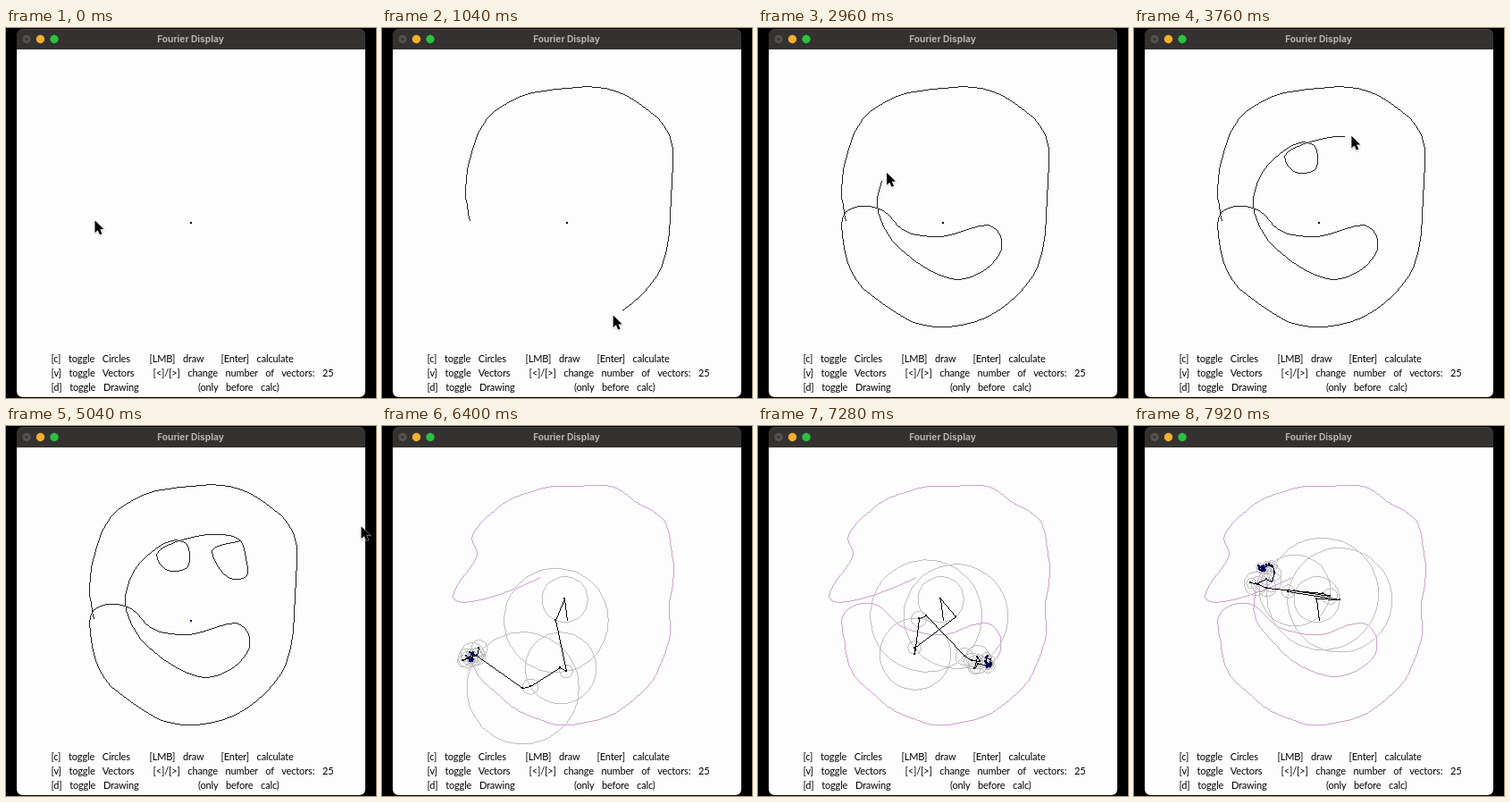
An HTML page with a canvas that plays this animation: 414 px wide and 414 px high, repeating every 8000 ms.

```html
<!DOCTYPE html>
<html lang="en">
<head>
<meta charset="utf-8">
<title>Fourier Display</title>
<style>
html, body { margin: 0; width: 100%; height: 100%; overflow: hidden; background: #000; }
svg, canvas { position: absolute; left: 0; top: 0; width: 414px; height: 414px; }
.title { font: 700 10.2px Inter, sans-serif; fill: #b4b2af; text-anchor: middle; }
.help { font: 400 11px Lato, sans-serif; letter-spacing: -0.15px; word-spacing: 6px; fill: #000; }
</style>
</head>
<body>
<svg viewBox="0 0 414 414">
  <rect x="12" y="1" width="390" height="60" rx="7" fill="#4a4946"/>
  <rect x="12" y="2" width="390" height="60" rx="7" fill="#333230"/>
  <path d="M12 24H402V406Q402 413 395 413H19Q12 413 12 406Z" fill="#fdfdfd"/>
  <circle cx="23" cy="12.5" r="4.7" fill="#53524f"/>
  <circle cx="23" cy="12.5" r="1.4" fill="#2f2e2c"/>
  <circle cx="38.5" cy="12.5" r="4.7" fill="#f6b02c"/>
  <circle cx="54" cy="12.5" r="4.7" fill="#2ac23f"/>
  <text class="title" x="206.5" y="16">Fourier Display</text>
  <g class="help">
    <text x="50.5" y="374">[c] toggle Circles</text>
    <text x="160.5" y="374">[LMB] draw</text>
    <text x="240.5" y="374">[Enter] calculate</text>
    <text x="50.5" y="390">[v] toggle Vectors</text>
    <text x="164.5" y="390">[&lt;]/[&gt;] change number of vectors: 25</text>
    <text x="50.5" y="406">[d] toggle Drawing</text>
    <text x="215" y="406">(only before calc)</text>
  </g>
</svg>
<canvas width="414" height="414"></canvas>
<script>
const ctx = document.querySelector('canvas').getContext('2d');
const LOOP = 8000, STEP = 80, TAU = Math.PI * 2;
const LEAVE = 4640, CALC = 6000, TURN = 4950;
const CENTER = [207, 218], ORDER = 25, SAMPLES = 720;
const INK = '#1c1c1c', NAVY = '#00005c', PLUM = '#cfa0d2', GREY = '#bebebe';

const mix = (a, b, k) => a + (b - a) * k;
const clamp01 = v => Math.min(1, Math.max(0, v));
const distance = (p, q) => Math.hypot(q[0] - p[0], q[1] - p[1]);

// Key points of one stroke: head, mouth, left eye, right eye.
const knots = `98,216 93,180 101,135 117,101 155,76 207,67 250,67 290,86 321,119 323,190 313,265
  280,307 240,329 185,332 145,312 110,282 95,240 97,206 118,199 140,204 163,226 205,233
  258,220 271,233 270,252 245,275 215,280 165,252 140,222 133,190 149,153 185,128
  201,131 203,157 180,161 168,143 190,129 235,121 261,127 268,148 268,168 250,170 230,139 262,128`
  .split(/\s+/).map(pair => pair.split(',').map(Number));

// Centripetal spline through the knots.
const gap = i => Math.sqrt(distance(knots[i], knots[i + 1]));
function tangent(i, c) {
  const slope = j => (knots[j + 1][c] - knots[j][c]) / gap(j);
  if (i === 0) return slope(0);
  if (i === knots.length - 1) return slope(i - 1);
  return (slope(i - 1) * gap(i) + slope(i) * gap(i - 1)) / (gap(i - 1) + gap(i));
}
function splineAt(i, k) {
  const k2 = k * k, k3 = k2 * k, h = 3 * k2 - 2 * k3;
  return [0, 1].map(c => mix(knots[i][c], knots[i + 1][c], h) +
    gap(i) * (tangent(i, c) * (k3 - 2 * k2 + k) + tangent(i + 1, c) * (k3 - k2)));
}
const points = [knots[0]];
for (let i = 0; i < knots.length - 1; i++) {
  for (let k = 1; k <= 4; k++) points.push(splineAt(i, k / 4));
}
const lengths = [0];
for (let i = 1; i < points.length; i++) lengths.push(lengths[i - 1] + distance(points[i - 1], points[i]));
const total = lengths[lengths.length - 1];

function pointAt(share) {
  const length = share * total;
  let i = 1;
  while (i < points.length - 1 && lengths[i] < length) i++;
  const k = (length - lengths[i - 1]) / (lengths[i] - lengths[i - 1]);
  return [0, 1].map(c => mix(points[i - 1][c], points[i][c], k));
}

// The hand slows down: [time, share of the stroke drawn].
const pace = [[80, 0], [880, 0.304], [2080, 0.61], [3760, 0.902], [4560, 1]];
function drawnAt(t) {
  let i = 1;
  while (i < pace.length - 1 && pace[i][0] < t) i++;
  const [t0, a] = pace[i - 1], [t1, b] = pace[i];
  return mix(a, b, clamp01((t - t0) / (t1 - t0)));
}

const samples = Array.from({ length: SAMPLES }, (_, i) => {
  const u = (i + 0.5) / SAMPLES;
  return pointAt(u + 0.012 * Math.sin(Math.PI * u)).map((v, c) => v - CENTER[c]);
});

// Fourier coefficients in the order 0, -1, 1, -2, 2 ...
const freqs = [0];
for (let n = 1; n <= ORDER; n++) freqs.push(-n, n);
const vectors = freqs.map(n => {
  let re = 0, im = 0;
  samples.forEach(([x, y], i) => {
    const a = -n * (i + 0.5) / SAMPLES * TAU, c = Math.cos(a), s = Math.sin(a);
    re += x * c - y * s;
    im += x * s + y * c;
  });
  return { n, r: Math.hypot(re, im) / SAMPLES, angle: Math.atan2(im, re) };
});

function jointsAt(turn) {
  let [x, y] = CENTER;
  const joints = [[x, y]];
  for (const { n, r, angle } of vectors) {
    x += r * Math.cos(angle + n * turn * TAU);
    y += r * Math.sin(angle + n * turn * TAU);
    joints.push([x, y]);
  }
  return joints;
}
const TRACE_STEPS = 360;
const trace = Array.from({ length: TRACE_STEPS }, (_, i) => jointsAt(i / TRACE_STEPS).pop());

// Lines without smoothing, one pixel wide.
function pixelLine(path, color) {
  ctx.fillStyle = color;
  const dots = path.map(p => p.map(Math.round));
  for (let j = 1; j < dots.length; j++) {
    const [x0, y0] = dots[j - 1], [x1, y1] = dots[j];
    const n = Math.max(1, Math.abs(x1 - x0), Math.abs(y1 - y0));
    for (let i = 1; i <= n; i++) {
      ctx.fillRect(Math.round(mix(x0, x1, i / n)), Math.round(mix(y0, y1, i / n)), 1, 1);
    }
  }
}

function pixelCircle([x, y], r) {
  const n = Math.ceil(8 + r);
  pixelLine(Array.from({ length: n + 1 }, (_, i) =>
    [x + r * Math.cos(i / n * TAU), y + r * Math.sin(i / n * TAU)]), GREY);
}

function dot([x, y], color) {
  ctx.fillStyle = color;
  ctx.fillRect(Math.round(x) - 1, Math.round(y) - 1, 2, 2);
}

function drawPen(t) {
  const share = drawnAt(t);
  if (share) pixelLine([...points.filter((_, i) => lengths[i] < share * total), pointAt(share)], INK);
  dot(CENTER, NAVY);
}

function drawCursor(t) {
  const [px, py] = pointAt(drawnAt(t > 80 ? t + 33 : t));
  const k = clamp01((t - LEAVE) / 400), ease = k * k * (3 - 2 * k);
  const drift = 3 * clamp01((t - 5120) / 160);
  ctx.save();
  ctx.translate(mix(px + 1, 397, ease) + drift, mix(py - 1, 112, ease));
  ctx.shadowColor = 'rgba(0,0,0,.4)';
  ctx.shadowBlur = 2.5;
  ctx.shadowOffsetY = 1;
  ctx.lineWidth = 1.2;
  ctx.strokeStyle = 'rgba(255,255,255,.6)';
  const arrow = new Path2D('M.5 .5V14L3.7 11.2 6 16.3 8.4 15.3 6.2 10.3 10.3 10.1Z');
  ctx.stroke(arrow);
  ctx.shadowColor = 'transparent';
  ctx.fillStyle = '#000';
  ctx.fill(arrow);
  ctx.restore();
}

function drawFourier(t) {
  const turn = 0.375 + (t - CALC) / TURN;
  const joints = jointsAt(turn);
  pixelLine([...trace.slice(0, Math.ceil(turn * TRACE_STEPS)), joints[vectors.length]], PLUM);
  vectors.forEach(({ n, r }, i) => n && pixelCircle(joints[i], r));
  vectors.forEach(({ n }, i) => {
    pixelLine([joints[i], joints[i + 1]], '#000');
    dot(joints[i + 1], Math.abs(n) > 4 ? NAVY : '#000');
  });
}

function render(t) {
  ctx.clearRect(0, 0, 414, 414);
  if (t >= CALC) {
    drawFourier(t);
  } else {
    drawPen(t);
    drawCursor(t);
  }
}

const start = performance.now();
function tick() {
  const t = (performance.now() - start) % LOOP;
  render(Math.floor(t / STEP) * STEP);
  requestAnimationFrame(tick);
}
tick();
</script>
</body>
</html>
```
